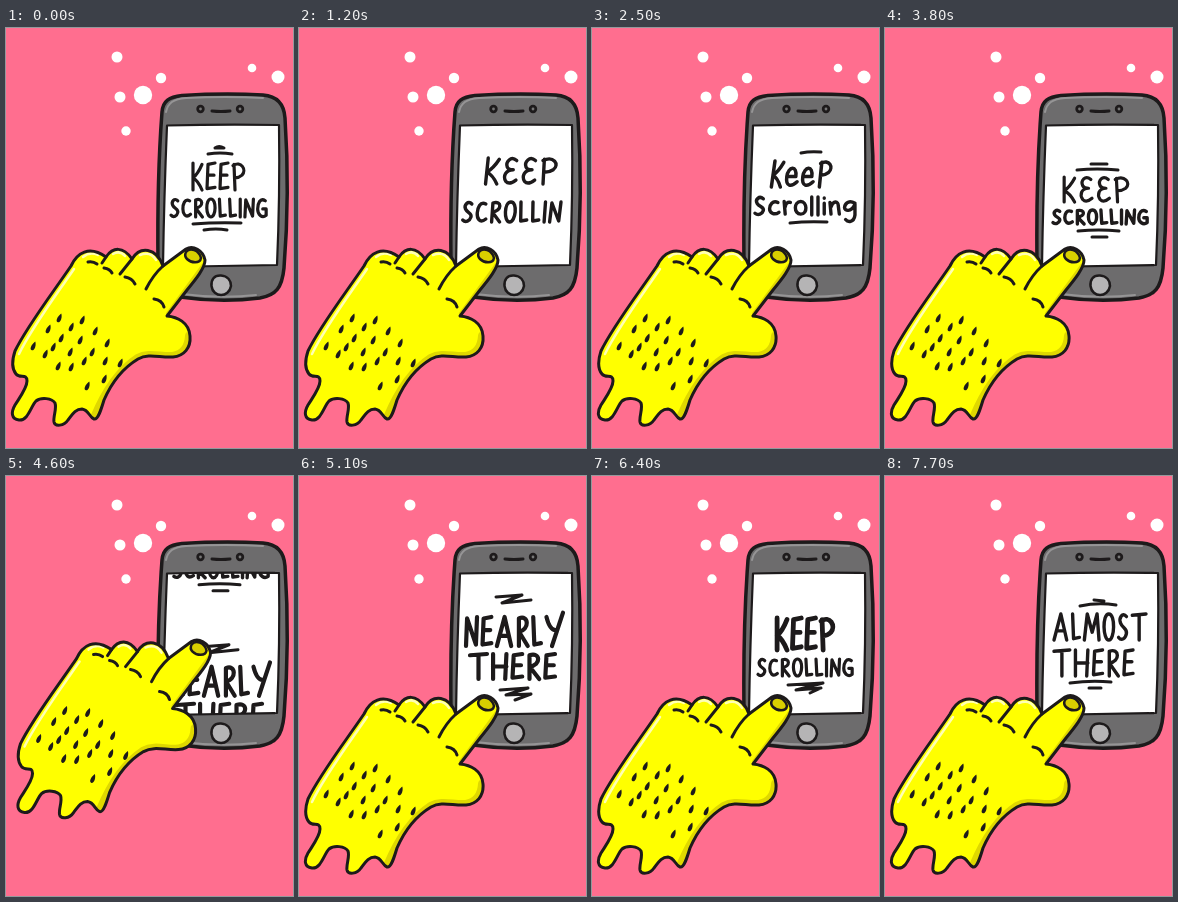
An HTML page that plays this animation: 287 px wide and 420 px high, repeating every 8 s.

```html
<!DOCTYPE html>
<html lang="en">
<head>
<meta charset="utf-8">
<title>Keep scrolling</title>
<style>
html, body { margin: 0; width: 100%; height: 100%; overflow: hidden; background: #ff6e8f; }
svg { display: block; width: 100%; height: 100%; }
.ink { fill: none; stroke: #1d1a1b; stroke-width: 3; stroke-linecap: round; stroke-linejoin: round; }
.slide path { vector-effect: non-scaling-stroke; }
</style>
</head>
<body>
<svg viewBox="0 0 287 420">
  <defs>
    <path id="screenShape" d="M161 97.5Q218 96 273 97Q274 170 271 237Q215 238 157 239Q158 170 161 97.5Z"/>
    <clipPath id="screenClip"><use href="#screenShape"/></clipPath>
    <path id="handShape" d="M157 238L180 221C187 217 197 222 199 232C199 240 190 251 181 262L161 288
      C171 289 183 294 184 308C185 320 178 328 167 329C154 330 143 325 132 331
      C117 340 105 356 98 372C95 382 92 392 88 391C83 389 83 382 76 381C69 381 66 387 62 392
      C58 398 49 399 48 394C47 388 51 381 49 375C46 370 35 369 30 373C25 378 22 393 13 392
      C5 391 5 384 9 377C14 369 21 360 21 353C21 345 14 351 10 346C6 341 6 332 9 323
      C20 300 43 270 65 238C71 225 83 217 100 229C107 219 117 218 126 231C134 218 150 219 157 238Z"/>
    <clipPath id="handClip"><use href="#handShape"/></clipPath>
  </defs>

  <g id="dots" fill="#fff"></g>

  <path d="M156 84C157 73 163 69 176 67.500Q218 65 257 67C270 68 278 75 279 90Q284 165 278 240C276 260 270 267 254 270Q215 275 174 269C158 266 152 255 152 236Q151 150 156 84Z" fill="#6d6c6d" stroke="#1d1a1b" stroke-width="3.500"/>
  <path d="M160 84C162 75 167 71 180 70Q220 68 257 70M156 246C158 260 164 264 176 266Q215 271 250 267" fill="none" stroke="#969596" stroke-width="2" stroke-linecap="round"/>
  <use href="#screenShape" fill="#fff"/>
  <g id="slides" clip-path="url(#screenClip)"></g>
  <use href="#screenShape" class="ink" style="stroke-width:2.200"/>
  <path class="ink" d="M206 83Q215 84 224 83"/>
  <g fill="#1d1a1b"><circle cx="194.500" cy="81" r="4.200"/><circle cx="234" cy="81" r="4.200"/></g>
  <g fill="#777"><circle cx="194.500" cy="81" r="1.400"/><circle cx="234" cy="81" r="1.400"/></g>
  <path d="M215 247.500C222 248 225 253 225 258C223 270 207 270 205.500 258C205 252 208 247 215 247.500Z" fill="#b5b4b5" stroke="#1d1a1b" stroke-width="2.500"/>

  <g id="hand">
    <use href="#handShape" fill="#ff0"/>
    <g clip-path="url(#handClip)" fill="none" stroke-linecap="round">
      <path d="M89 390C99 366 112 344 132 331C143 325 154 330 167 329Q183 326 184 308" stroke="#dfd800" stroke-width="10"/>
      <path d="M163 286L198 238" stroke="#dfd800" stroke-width="6"/>
      <path d="M13 326C25 301 46 273 68 241" stroke="#ffffb4" stroke-width="2.500"/>
      <path d="M77 229Q84 223 92 227M107 226Q114 222 119 228M134 227Q145 223 150 232" stroke="#ffffb4" stroke-width="2.500"/>
    </g>
    <use href="#handShape" class="ink"/>
    <path class="ink" d="M82 234Q87 233 91 236M100 229L96 235M98 240Q104 241 106 245M126 231L114 246M119 249Q126 250 129 256M157 238Q147 247 140 261M148 271Q156 272 158 279"/>
    <path d="M180 224C184 219 193 222 195 230C194 236 185 235 181 231Q178 228 180 224Z" fill="#d9d000" stroke="#1d1a1b" stroke-width="2.500"/>
    <g id="seeds" fill="#1d1a1b"></g>
  </g>
</svg>
<script>
const el = (tag, attrs, parent) => {
  const node = document.createElementNS('http://www.w3.org/2000/svg', tag);
  for (const key in attrs) node.setAttribute(key, attrs[key]);
  return parent.appendChild(node);
};
const byId = id => document.getElementById(id);

for (const [cx, cy, r] of [[111, 29, 5.5], [155, 50, 5.2], [137, 67, 9.2], [114, 69, 5.5], [120, 103, 4.7], [246, 40, 4.3], [272, 49, 6.5]])
  el('circle', { cx, cy, r }, byId('dots'));

const seeds = [[53, 290], [76, 292], [65, 299], [42, 301], [89, 303], [55, 310], [74, 312], [27, 318], [47, 319], [101, 315],
  [39, 326], [64, 324], [86, 324], [114, 335], [52, 338], [78, 333], [99, 333], [65, 339], [98, 351], [81, 358]];
for (const [x, y] of seeds)
  el('path', { d: 'M1-5C3-2 3 4 0 4.5C-3 4-2-1 1-5Z', transform: `translate(${x} ${y}) rotate(15)` }, byId('seeds'));

// Brush letters, 20 units tall: [width, strokes]; "3" is a rounded E
const glyphs = {
  A: [14, 'M0 20L7 0L13 20M3 13H11'],
  C: [9, 'M8 2C2-1 0 6 0 11S3 22 9 17'],
  E: [8, 'M8 0L1 1L0 19L8 18M1 9L7 9'],
  3: [10, 'M9 2C4-2 0 3 2 7Q3 9 7 9C1 9-1 14 2 18Q5 21 10 17'],
  G: [11, 'M9 2C3-2 0 5 0 11S5 22 10 18L10 11L6 11'],
  H: [11, 'M0 0V20M11 0L10 20M0 10H11'],
  I: [1, 'M.5 0V20'],
  K: [10, 'M1 0L1 20M10 1Q6 8 1 11Q6 13 10 20'],
  L: [7, 'M0 0L1 19L7 18'],
  M: [15, 'M0 20L3 0L8 14L13 0L15 20'],
  N: [10, 'M0 20L1 1L9 19L10 0'],
  O: [10, 'M5 0C-2 0-1 20 5 20S12 0 5 0Z'],
  P: [11, 'M1 1L2 20M0 2C8-2 14 5 9 9Q6 11 2 11'],
  R: [9, 'M1 20L1 1C10-2 11 9 1 10L9 20'],
  S: [9, 'M8 2C4-2 0 3 2 7S9 11 8 15S3 21 0 18'],
  T: [14, 'M0 1L14 0M7 1L7 20'],
  Y: [15, 'M0 0Q3 9 8 9M15-3L5 20'],
  c: [9, 'M8 6C3 3 0 9 0 13S4 21 9 17'],
  e: [11, 'M1 12H9C9 3 0 4 0 12S6 20 11 16'],
  g: [11, 'M10 7C3 2 0 9 0 12S6 18 10 8V20C9 29 3 28 1 25'],
  i: [1, 'M.5 7V19M.5 1V1.5'],
  l: [1, 'M.5 0V20'],
  n: [9, 'M0 6L1 19M1 11C3 4 8 4 8 10L9 19'],
  o: [10, 'M5 5C-2 5-2 19 5 19S11 5 5 5Z'],
  r: [6, 'M0 5L1 19M1 11Q2 5 6 6']
};
const GAP = 5;

// Each line: text, x, y, width, height, stroke, slant
const slides = [
  { lines: [['KEEP', 186, 135, 52, 27, 3.2], ['SCROLLING', 165, 171, 96, 18, 3.2]],
    marks: 'M209 120Q213 117 218 120ZM202 126Q214 124 226 126M187 196Q211 194 235 195M198 202Q210 200 221 202' },
  { lines: [['K33P', 188, 130, 70, 26, 3.4, 6], ['SCROLLIN', 165, 174, 97, 20, 3.4, 4]], marks: '' },
  { lines: [['KeeP', 182, 133, 58, 26, 3.5, 8], ['Scrolling', 163, 169, 101, 18, 3.4]],
    marks: 'M209 125Q218 123 229 124M198 195Q215 193 235 194' },
  { lines: [['K33P', 178, 149, 65, 25, 3.2], ['SCROLLING', 168, 182, 95, 14, 3.4]],
    marks: 'M206 136L222 136M192 142Q212 140 233 142M193 203Q214 201 234 203M207 209L222 209' },
  { lines: [['NEARLY', 167, 141, 97, 29, 4.2], ['THERE', 171, 178, 85, 25, 4.2]],
    marks: 'M197 121L223 119L203 127L232 124M201 214L229 212L207 219L232 218L216 224' },
  { lines: [['KEEP', 184, 142, 57, 32, 4.8], ['SCROLLING', 166, 183, 95, 17, 3.2]],
    marks: 'M196 209L231 207L204 214L229 212L218 217' },
  { lines: [['ALMOST', 169, 138, 92, 26, 3.4], ['THERE', 169, 174, 79, 26, 3.4]],
    marks: 'M209 124L219 125M195 130Q213 126 231 129M185 207Q206 204 226 206M204 212L216 212' }
];

const groups = slides.map(({ lines, marks }) => {
  const group = el('g', { class: 'slide ink' }, byId('slides'));
  for (const [text, x, y, w, h, stroke, slant = 0] of lines) {
    const total = [...text].reduce((sum, c) => sum + glyphs[c][0] + GAP, -GAP);
    const row = el('g', {
      transform: `translate(${x} ${y}) skewX(${-slant}) scale(${w / total} ${h / 20})`,
      'aria-label': text.replace(/3/g, 'E')
    }, group);
    row.style.strokeWidth = stroke;
    let pen = 0;
    for (const c of text) {
      el('path', { d: glyphs[c][1], transform: `translate(${pen} 0)` }, row);
      pen += glyphs[c][0] + GAP;
    }
  }
  el('path', { d: marks }, group);
  return group;
});

const LOOP = 8000, FIRST = 500, PERIOD = 1300, STEP = 100, STEPS = 8, TRAVEL = 144;

function draw(now) {
  const t = now % LOOP - FIRST;
  const swipe = Math.floor(t / PERIOD);
  const step = t < 0 ? STEPS : Math.min(STEPS, Math.floor((t - swipe * PERIOD) / STEP) + 1);
  const scrolled = (1 - Math.cos(Math.PI * Math.min(1, step / 5))) / 2;
  const position = swipe + scrolled;
  groups.forEach((group, i) => {
    group.setAttribute('transform', `translate(0 ${(i - position) * TRAVEL})`);
    group.style.display = Math.abs(i - position) < 1 ? '' : 'none';
  });
  const lift = Math.sin(Math.PI * step / STEPS);
  byId('hand').setAttribute('transform', `translate(${6 * lift} ${-60 * lift})`);
  requestAnimationFrame(() => draw(performance.now()));
}
draw(0);
</script>
</body>
</html>
```
